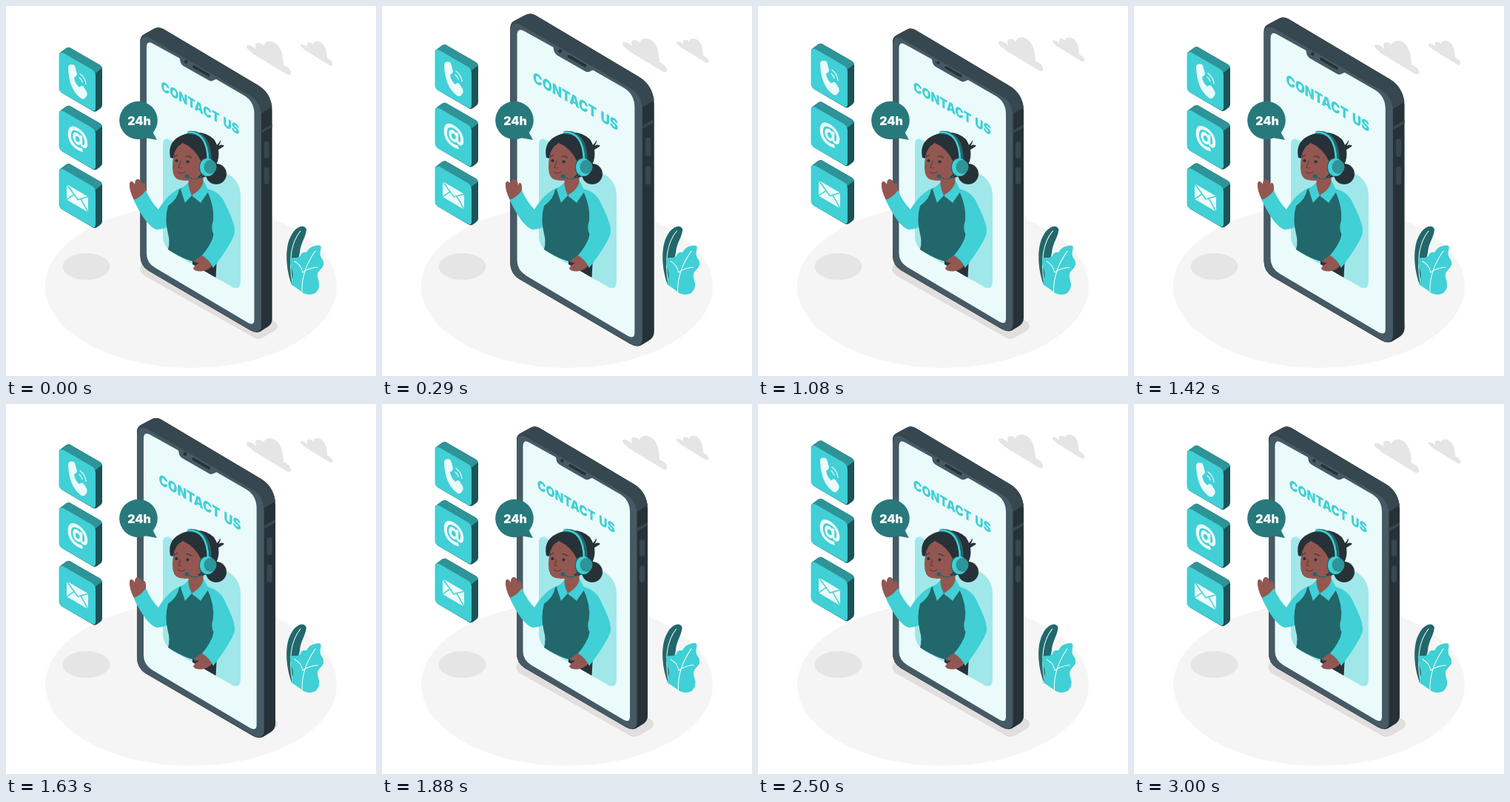
Recreate the animation shown at these times as an HTML page. Size 500 px wide and 500 px high, loop 3.04 s.

```html
<!DOCTYPE html>
<html lang="en">
<head>
<meta charset="utf-8">
<title>Contact us</title>
<style>
html, body { margin: 0; width: 100%; height: 100%; overflow: hidden; background: #fff; }
svg { display: block; width: 100%; height: 100%; }
text { font-family: Inter, "Open Sans", sans-serif; font-weight: 900; }
.cyan { fill: #40d0d6; }
.deep { fill: #22676b; }
.mid { fill: #2e9498; }
.shade { fill: #1a5358; }
.bubble { fill: #28797c; }
.night { fill: #263238; }
.slate { fill: #37474f; }
.rim { fill: #455a64; }
.skin { fill: #935751; }
.pale { fill: #ebfafb; }
.line { fill: none; stroke-linecap: round; stroke-linejoin: round; }
</style>
</head>
<body>
<svg viewBox="0 0 500 500">
  <defs>
    <path id="cloud" fill="#e5e5e5" d="M326 58Q323 53 328 53Q334 54 338 59Q335 50 341 50Q346 50 348 54Q350 47 358 48Q374 51 375 80Q383 83 385 89Q386 95 380 93L334 65Q330 61 326 58Z"/>
    <g id="tile">
      <path class="shade" d="M72 68Q71 64 75 62L81 57.500Q85 55 88 57.500L127 80Q130 82 130 86V134Q130 137 127 139L123 142Q120 144 117 142L76 118Q72 115 72 111Z"/>
      <path class="mid" d="M72 68Q71 64 75 62L81 57.500Q85 55 88 57.500L127 80Q129 81 130 84L121 91L118 91L77 67Z"/>
      <path class="cyan" d="M71.500 69Q72 61 78 64L116 86Q121 89 121 95V138Q121 144 116 141L76 118Q71.500 115 71.500 111Z"/>
    </g>
  </defs>

  <ellipse cx="250" cy="379" rx="197" ry="110" fill="#f5f5f5"/>
  <ellipse cx="108.500" cy="352" rx="32" ry="18" fill="#e5e5e5"/>
  <path fill="#e2dede" d="M184 349Q177 358 188 365L333 447Q340 452 347 448L363 439Q371 433 364 427L340 412L200 340Z"/>

  <g id="phone">
    <path class="night" d="M182 51Q181 42 188 39L201 32Q207 29 213 32.500L340 108Q358 119 359 141V422Q359 429 352 433L343 438.500Q337 441 330 437L193 357Q182 350 182 337Z"/>
    <path class="slate" d="M183 47Q182 42 188 39L201 32Q207 29 213 32.500L340 108Q356 117 359 137L344 146L320 125L194 54Z"/>
    <path class="slate" d="M345 168L359 160V164L345 172Z"/>
    <rect class="slate" x="348" y="183" width="7" height="23" rx="3.500"/>
    <rect class="slate" x="348" y="218" width="7" height="23" rx="3.500"/>
    <path class="rim" d="M182 52Q182 40 194 44L329 122Q344 130 344.500 150V431Q344 441 333 438L193 357Q182 350 182 336Z"/>
    <path class="pale" d="M190.500 56Q191 48 198 51.500L235 72L236 77Q237 80 240 82L275 102Q279 103 281 101L284 100L322 122Q335 130 335 146V423Q335 431 327 427L202 353Q190.500 346 190.500 334Z"/>
    <circle class="night" cx="243.500" cy="76.500" r="2.300"/>
    <path class="line" stroke="#263238" stroke-width="3.500" d="M254 83L274 94.500"/>
    <text class="cyan" transform="matrix(.866 .5 0 1 210 114.500)" font-size="17.900" word-spacing="2">CONTACT US</text>
  </g>

  <path fill="#a0e7ea" d="M212 188Q212 176 222 181L300 227Q316 236 317 256V371Q317 385 306 380L226 334Q212 326 212 310Z"/>

  <g id="woman">
    <path class="skin" d="M174 264Q166 250 167 239Q170 234 174 241Q174 233 179 234Q184 236 184 243Q185 237 188 240Q190 244 188.500 253Z"/>
    <path class="cyan" d="M172.500 262Q182 259 189 249Q196 265 206 275Q216 257 233 247L244 243L226 290Q218 303 203 302Q189 297 172.500 262Z"/>
    <path class="night" d="M252 338L285 340L283.500 367L252 349Z"/>
    <path class="deep" d="M234 248L246 243L266 242L274 249L285 280Q283 300 279 316Q277 332 278 348Q250 350 219 329Q222 318 219 308Q214 288 219 270Q232 261 234 248Z"/>
    <path class="skin" d="M246 230L267 229Q265 241 271 245L254 260L243 247Q248 242 246 230Z"/>
    <path class="cyan" d="M246 239L236 248L242 266L251 256L263 266L274 250L267 236Q266 247 251 256Q247 248 246 239Z"/>

    <circle class="night" cx="284" cy="227" r="14"/>
    <path class="night" d="M278 193Q286 189 290 181Q290 186 287 189Q292 186 295 189Q289 194 280 197Z"/>
    <path class="night" d="M222 205Q217 181 242 173Q266 166 281 180Q294 200 281 220Q272 234 260 232L236 208Z"/>
    <path class="skin" d="M239 185Q228 191 226 205Q224 218 226 226Q228 235 238 235.500Q253 238 263 228L263 209Q256 193 239 185Z"/>
    <circle class="night" cx="230.500" cy="209" r="2.100"/>
    <circle class="night" cx="245.500" cy="210.500" r="2.100"/>
    <path class="line" stroke="#263238" stroke-width="1.200" d="M227 204Q229 201 232 202M244 203Q247 202 250 205"/>
    <path class="line" stroke="#663a36" stroke-width="1.100" d="M236 210L233 218L237 219M232 224Q237 228 242 224"/>

    <path class="line" stroke="#22676b" stroke-width="4.500" d="M248 171Q275 170 275.500 208"/>
    <path class="line" stroke="#40d0d6" stroke-width="2.600" d="M246 170.500Q272 170 273 208"/>
    <ellipse class="deep" cx="269.500" cy="218" rx="9" ry="12"/>
    <ellipse class="cyan" cx="272.500" cy="218" rx="10.500" ry="12"/>
    <ellipse class="mid" cx="276" cy="217.500" rx="8.500" ry="9.500"/>
    <path class="line" stroke="#22676b" stroke-width="1.300" d="M266 228Q258 238 246 231"/>
    <ellipse class="deep" cx="244.500" cy="230" rx="3" ry="2.700"/>

    <path class="skin" d="M279 350L267 335L259 341Q252 344 256 347L262 346Q253 352 253 355Q257 360 267 358Q275 356 279 350Z"/>
    <path class="cyan" d="M272 247Q290 251 297 269Q310 295 309 306Q306 320 280 354Q275 343 265 337Q277 323 281 309Q276 301 280 290Q282 272 272 250Z"/>
  </g>

  <path class="bubble" d="M187 178L204 181L197 168Z"/>
  <circle class="bubble" cx="179" cy="154.500" r="25.800"/>
  <text x="180" y="161" font-size="16" fill="#fff" text-anchor="middle">24h</text>

  <g id="plant">
    <path class="deep" d="M386 376C378 355 376 325 386 309C392 298 403 294 406 302C405 313 398 320 397 333C396 342 390 350 390 377Z"/>
    <path class="line" stroke="#fff" stroke-width="1" d="M398 304Q379 327 387 374"/>
    <path class="cyan" d="M385 376Q389 367 387 358Q380 340 389 340Q396 341 398 337Q400 332 406 333Q410 325 418 324Q428 321 425 330Q423 337 428 343Q432 350 424 357Q419 362 422 370Q426 381 418 388Q410 392 402 388Q394 382 385 376Z"/>
    <path class="line" stroke="#fff" stroke-width="1" d="M400 386Q399 358 418 331M401 360Q399 350 390 345M401 360Q409 354 421 353"/>
  </g>

  <g id="floaters">
    <use href="#cloud"/>
    <use href="#cloud" transform="translate(164 13.500) scale(.72)"/>
    <use href="#tile"/>
    <use href="#tile" y="78.700"/>
    <use href="#tile" y="157.400"/>
    <path class="pale" d="M84 84Q84 80 87 79.500L91 79.500Q93 80 93.500 83L96 92Q96 95 92 97Q93 105 99 110Q102 107 104.500 109L109 116Q110.500 119 109 122L106 125.500Q103 127 100 124Q85 112 84 84Z"/>
    <path class="line" stroke="#ebfafb" stroke-width="1.300" d="M99 97Q102 99 103 103M100 92Q107 97 108 106"/>
    <text class="pale" transform="matrix(.866 .5 0 1 97 188)" font-size="31" text-anchor="middle">@</text>
    <path class="pale" d="M82 241L111 258V279L82 262Z"/>
    <path class="line" stroke="#40d0d6" stroke-width="1.500" d="M82 241L97 262L111 258M82 262L92 255M111 279L101 261"/>
  </g>
</svg>
<script>
const LOOP = 3040;
const byId = id => document.getElementById(id);
const [phone, plant, floaters] = ['phone', 'plant', 'floaters'].map(byId);

// Linear interpolation through [position, value] stops
function track(p, stops) {
  const i = stops.findIndex(s => s[0] > p);
  const [a, from] = stops[i - 1], [b, to] = stops[i];
  return from + (to - from) * (p - a) / (b - a);
}

const beat = [[0, 1], [.1, 1.1], [.3, 1], [.4, 1], [.5, 1.1], [.6, 1], [1, 1]];
const lift = [[0, 0], [.25, -10], [.5, 0], [.75, -10], [1, 0]];
const sway = [[0, 0], [.25, 1], [.75, -1], [1, 0]];

function draw(now) {
  const p = (now / LOOP + .0066) % 1;
  phone.setAttribute('transform', `translate(270.5 235.3) scale(${track(p, beat)}) translate(-270.5 -235.3)`);
  floaters.setAttribute('transform', `translate(0 ${track(p, lift)})`);
  plant.setAttribute('transform', `rotate(${track(p, sway)} 404 344)`);
}

const start = performance.now();
function frame() {
  draw(performance.now() - start);
  requestAnimationFrame(frame);
}
draw(0);
requestAnimationFrame(frame);
</script>
</body>
</html>
```
